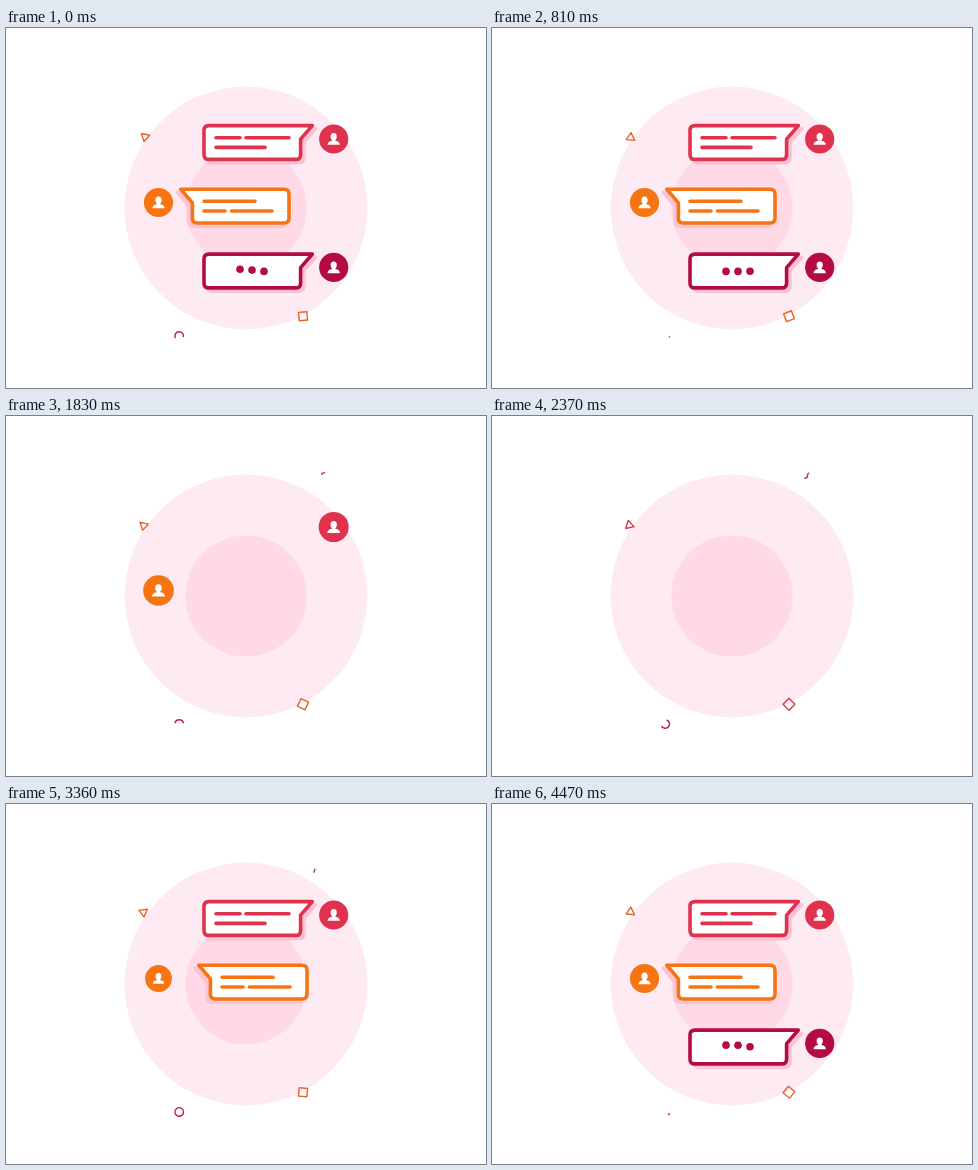
Animation of 480x360 px, one loop 4500 ms. Source, as an HTML page:

```html
<!DOCTYPE html>
<html lang="en">
<head>
<meta charset="utf-8">
<title>Chat bubbles</title>
<style>
  html, body { margin: 0; width: 100%; height: 100%; overflow: hidden; background: #fff; }
  svg { display: block; width: 100vw; height: 100vh; }
  .line { fill: none; stroke-width: 3.6; stroke-linecap: round; stroke-linejoin: round; }
  .thin { fill: none; stroke-width: 1.4; stroke-linejoin: round; }
</style>
</head>
<body>
<svg id="stage" viewBox="0 0 480 360">
  <defs>
    <path id="box" d="M203 97.6H306.3L294.6 111.2V126.4Q294.6 131.4 289.6 131.4H203Q198 131.4 198 126.4V102.6Q198 97.6 203 97.6Z"/>
    <g id="person" fill="#fff">
      <ellipse cy="-2.3" rx="3.1" ry="3.6"/>
      <path d="M-1.7 0H1.7V1.7Q6.2 2.6 6.2 5.8H-6.2Q-6.2 2.6 -1.7 1.7Z"/>
    </g>
  </defs>
  <circle cx="240" cy="180" r="121.4" fill="#fdeaf2"/>
  <circle cx="240" cy="180" r="60.6" fill="#ffd9e6"/>
  <g id="chat"></g>
  <g class="thin">
    <path id="triangle" d="M4.9 0L-2.45 4.24V-4.24Z"/>
    <rect id="square" x="-4.2" y="-4.2" width="8.4" height="8.4"/>
    <path id="arc" stroke="#bd1b43"/>
    <path id="squiggle" stroke="#b92f45" pathLength="100"
      d="M319 57Q315.5 56.2 315.5 59.4T312 62.2T308.8 64.6T307.4 68.6"/>
  </g>
</svg>
<script>
const LOOP = 4500;
const NS = 'http://www.w3.org/2000/svg';
const $ = id => document.getElementById(id);
const clamp = x => Math.max(0, Math.min(1, x));

function add(parent, tag, attrs) {
  const el = document.createElementNS(NS, tag);
  for (const k in attrs) el.setAttribute(k, attrs[k]);
  return parent.appendChild(el);
}

// side: +1 sits on the right, -1 on the left
const talks = [
  { side: 1, dy: 0, color: '#e0324f', ax: 327.7, ay: 111, enter: 2640, leave: 1490, pop: 1790,
    text: 'M210 109.7H234M240 109.7H283M210 119.4H259' },
  { side: -1, dy: 63.6, color: '#f67412', ax: 152.5, ay: 174.5, enter: 3105, leave: 1370, pop: 1775,
    text: 'M198 173.3H249M198 183H219M225.5 183H266' },
  { side: 1, dy: 128.5, color: '#b40b42', ax: 327.7, ay: 239.4, enter: 3570, leave: 1250, pop: 1550 }
];

for (const k of talks) {
  k.bubble = add($('chat'), 'g', {});
  const place = k.side > 0 ? `translate(0 ${k.dy})` : `translate(481 ${k.dy}) scale(-1 1)`;
  const body = add(k.bubble, 'g', { transform: place });
  add(body, 'use', { href: '#box', class: 'line', transform: 'translate(3.4 3.2)',
    style: 'fill:#fcc3d5;stroke:#fcc3d5' });
  add(body, 'use', { href: '#box', class: 'line', style: `fill:#fff;stroke:${k.color}` });
  if (k.text) add(k.bubble, 'path', { d: k.text, class: 'line', stroke: k.color });
  else k.dots = [234, 246, 258].map(cx => add(k.bubble, 'circle', { cx, fill: k.color }));
  k.avatar = add($('chat'), 'g', {});
  add(k.avatar, 'circle', { r: 14.6, fill: k.color });
  add(k.avatar, 'use', { href: '#person' });
}

const outBack = (x, s) => {
  const w = 1 - clamp(x);
  return 1 - w * w * ((s + 1) * w - s);
};
const inBack = x => {
  x = clamp(x);
  return x * x * (2.7 * x - 1.7);
};

// Linear interpolation between [time, a, b] rows
function track(rows, t) {
  let i = 0;
  while (i < rows.length - 2 && t >= rows[i + 1][0]) i++;
  const [p, q] = [rows[i], rows[i + 1]];
  const u = clamp((t - p[0]) / (q[0] - p[0]));
  return [p[1] + (q[1] - p[1]) * u, p[2] + (q[2] - p[2]) * u];
}

const arcKeys = [
  [0, 150, 375], [810, 365, 380], [1830, 550, 710], [2850, 740, 1010],
  [3360, 711, 1070], [3780, 1050, 1070], [4470, 1095, 1125]
];
const squiggleKeys = [
  [1500, 0, 0], [1830, 0, 24], [2850, 16, 76], [3360, 78, 100], [3600, 100, 100]
];

function show(el, scale, x, y, dx = 0) {
  el.setAttribute('display', scale > 0.005 ? 'inline' : 'none');
  el.setAttribute('transform', `translate(${x + dx} ${y}) scale(${Math.max(scale, 0.001)})`);
}

function drawTalk(k, t) {
  const p = t - k.enter;
  const arriving = p >= 0;
  const slide = arriving ? 62 * (1 - outBack((p - 163) / 230, 3.5)) * k.side : 0;
  const size = arriving ? 1 : 1 - inBack((t - k.leave) / 250);
  const cx = 240.5 + 11 * k.side, cy = 114.5 + k.dy;
  show(k.bubble, size, cx * (1 - size), cy * (1 - size), slide);
  k.bubble.setAttribute('opacity', arriving ? clamp((p - 10) / 90) : 1);

  const face = arriving ? (p > 204 ? outBack((p - 204) / 170, 1.7) : 0)
                        : 1 - inBack((t - k.pop) / 270);
  show(k.avatar, face, k.ax, k.ay);

  if (k.dots) k.dots.forEach((dot, i) => {
    const peak = [485, 446, 399][i];
    let d = (t - peak) % 500;
    if (d > 250) d -= 500;
    if (d < -250) d += 500;
    const lift = Math.abs(d) < 90 ? 2.3 * Math.cos(d / 90 * Math.PI / 2) : 0;
    const grow = arriving ? outBack((p - 330 - i * 60) / 180, 1.7) : 1;
    dot.setAttribute('cy', 243.4 - lift);
    dot.setAttribute('r', Math.max(0, 3.8 * grow));
  });
}

function drawShapes(t) {
  const tint = t > 2050 && t < 3270 ? '#d93650' : '#e4642c';
  const turn = t * 0.0655;
  $('triangle').setAttribute('stroke', tint);
  $('triangle').setAttribute('transform',
    `translate(138.1 108.8) rotate(${turn}) translate(0.9 0) rotate(102)`);
  $('square').setAttribute('stroke', tint);
  $('square').setAttribute('transform', `translate(297 288.2) rotate(${-5 - 2 * turn})`);

  const [a, b] = track(arcKeys, t);
  const at = deg => {
    const r = deg * Math.PI / 180;
    return `${173.2 + 4.3 * Math.cos(r)} ${308 + 4.3 * Math.sin(r)}`;
  };
  $('arc').setAttribute('d', `M${at(a)}A4.3 4.3 0 ${b - a > 180 ? 1 : 0} 1 ${at(b)}`);

  const [from, to] = track(squiggleKeys, t);
  const line = $('squiggle');
  line.setAttribute('display', to - from > 0.5 ? 'inline' : 'none');
  line.setAttribute('stroke-dasharray', `${to - from} 200`);
  line.setAttribute('stroke-dashoffset', -from);
}

function draw(t) {
  for (const k of talks) drawTalk(k, t);
  drawShapes(t);
}

const start = performance.now();
function tick() {
  draw((performance.now() - start) % LOOP);
  requestAnimationFrame(tick);
}
tick();
</script>
</body>
</html>
```
